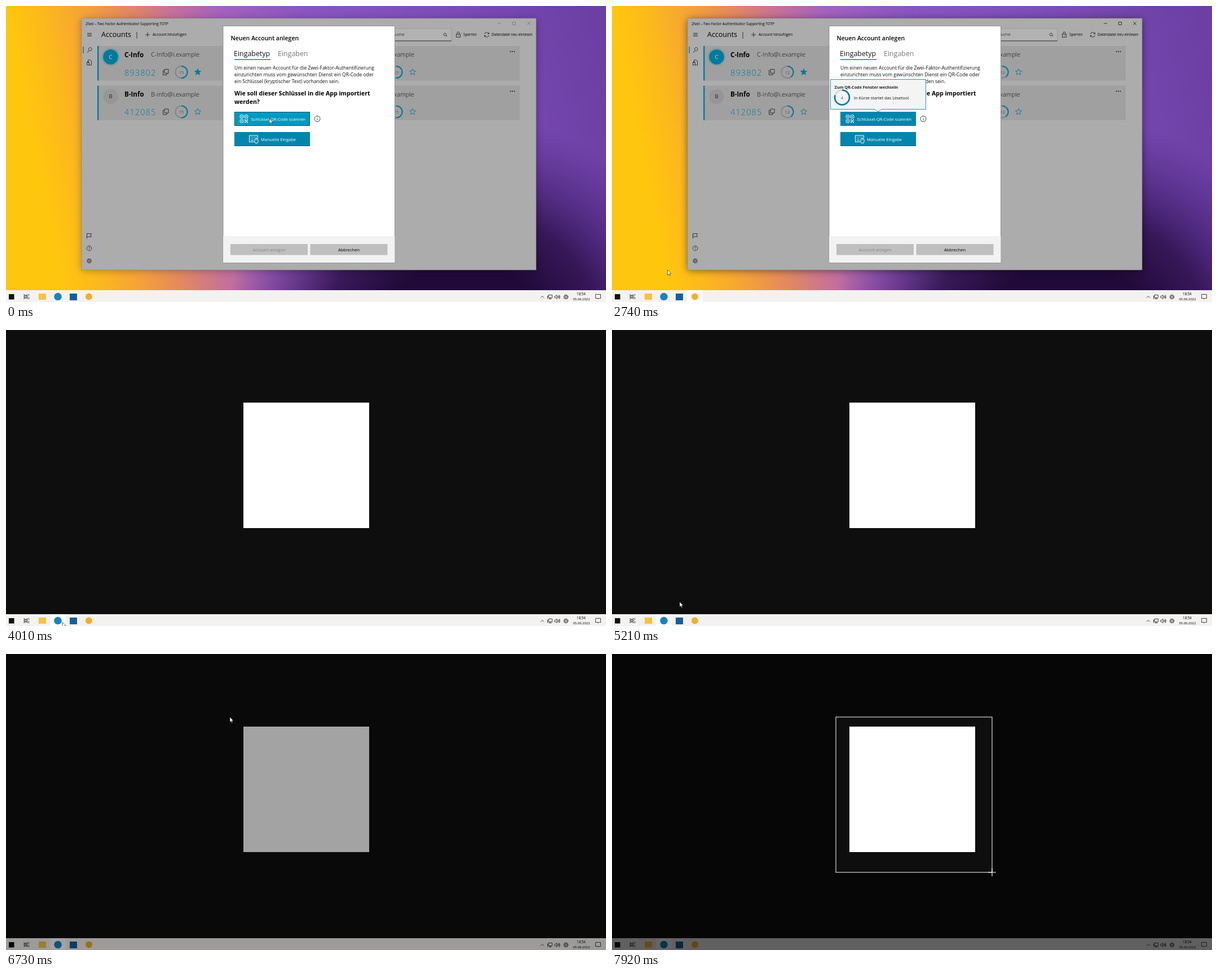
An HTML page for the animation above (8 s loop, 1064 by 526 pixels).

```html
<!DOCTYPE html>
<html lang="de">
<head>
<meta charset="utf-8">
<title>Account anlegen</title>
<style>
html, body { margin: 0; height: 100%; overflow: hidden; background: #0e0e0e; }
svg { display: block; width: 100vw; height: 100vh; }
text { font-family: "Open Sans", "Noto Sans", sans-serif; white-space: pre; }
.line { fill: none; stroke: #161616; stroke-width: .8; }
.white { fill: none; stroke: #fff; stroke-width: 1; }
</style>
</head>
<body>
<svg id="stage" viewBox="0 0 1064 526" preserveAspectRatio="none"></svg>
<script>
const BLUE = '#0086ad', DEEP = '#007b9c';

// Markup helpers; text is placed by the middle of its capitals.
const text = (x, y, size, str, attr = '') =>
  `<text x="${x}" y="${y + size * .357}" font-size="${size}" ${attr}>${str}</text>`;
const rect = (x, y, w, h, fill, attr = '') =>
  `<rect x="${x}" y="${y}" width="${w}" height="${h}" fill="${fill}" ${attr}/>`;
const disc = (x, y, r, fill, attr = '') =>
  `<circle cx="${x}" cy="${y}" r="${r}" fill="${fill}" ${attr}/>`;
const icon = (x, y, d, cls = 'line') =>
  `<path class="${cls}" transform="translate(${x} ${y})" d="${d}"/>`;
const MID = 'text-anchor="middle"';

const gear = (x, y) =>
  disc(x, y, 3.7, 'none', 'stroke="#222" stroke-width="1.1" stroke-dasharray="1.6 1.3"') +
  disc(x, y, 3, 'none', 'stroke="#222" stroke-width=".7"') +
  disc(x, y, 1.2, 'none', 'stroke="#222" stroke-width=".7"');

function star(x, y, fill) {
  const pts = Array.from({ length: 10 }, (_, i) => {
    const r = i % 2 ? 2.6 : 5.8, a = i * Math.PI / 5;
    return (x + r * Math.sin(a)).toFixed(2) + ',' + (y - r * Math.cos(a)).toFixed(2);
  });
  return `<polygon points="${pts.join(' ')}" fill="${fill}" stroke="${DEEP}" stroke-width=".9"/>`;
}

const ring = (x, y, r, w, max, cls, base) =>
  disc(x, y, r, 'none', `stroke="${base}" stroke-width="${w}"`) +
  disc(x, y, r, 'none', `class="${cls}Arc" stroke="${DEEP}" stroke-width="${w}" ` +
    `pathLength="${max}" transform="rotate(-90 ${x} ${y})"`) +
  text(x, y + .3, 7.6, '', `class="${cls}Num" fill="#555" ${MID}`);

function account(y, letter, mail, code, active) {
  const mid = y + 46.5;
  return rect(163, y, 748, 61.5, '#a0a0a0') + rect(162, y, 2.4, 61.5, DEEP) +
    (active ? disc(185.5, y + 19.5, 16, '#0086ad', 'opacity=".2"') : '') +
    disc(185.5, y + 19.5, 13.3, active ? DEEP : '#969696') +
    text(185.5, y + 19.5, 9.5, letter, `${MID} fill="${active ? '#c4d8de' : '#222'}"`) +
    text(210, y + 15.5, 11.6, letter + '-Info', 'font-weight="700"') +
    [257, 638].map(x => text(x, y + 15.5, 11, mail, 'font-weight="300" fill="#111"')).join('') +
    text(210, mid + 1, 14.5, code, `font-weight="300" letter-spacing="1.1" fill="${DEEP}"`) +
    icon(283, mid, 'M-2-5H5V2H-2zM-2-2.500H-4.500V5H2V2') +
    ring(311, mid, 10.6, 2, 30, 'code', '#868686') + ring(692, mid, 10.6, 2, 30, 'code', '#868686') +
    star(340, mid, active ? DEEP : 'none') + star(721, mid, 'none') +
    [894.5, 898, 901.5].map(x => disc(x, y + 10, .9, '#111')).join('');
}

const desktop = rect(0, 0, 1064, 526, 'url(#sky)') + rect(0, 0, 1064, 526, 'url(#night)');

const appWindow =
  rect(134, 24, 806, 446, '#000', 'id="shade" filter="url(#blur)"') +
  rect(134, 22, 806, 447, '#acacac', 'stroke="#8c8c8c" stroke-width=".6"') +
  text(141, 31.5, 6.33, '2fast – Two Factor Authenticator Supporting TOTP') +
  `<g id="caption">${icon(875, 31, 'M-3 0H3')}${icon(901, 31, 'M-2.500-2.500H2.500V2.500H-2.500z')}` +
  `${icon(927, 31, 'M-2.700-2.700L2.700 2.700M2.700-2.700L-2.700 2.700')}</g>` +
  icon(148, 51, 'M-4-2.500H4M-4 0H4M-4 2.500H4') +
  text(169, 50.5, 12.5, 'Accounts') + icon(232, 52, 'M0-6V6') +
  icon(251, 51, 'M-4 0H4M0-4V4') + text(260, 51, 6.5, 'Account hinzufügen') +
  rect(600, 40, 190, 22, '#b2b2b2', 'stroke="#8e8e8e" stroke-width=".6"') + icon(600, 62, 'M0 0H190') +
  text(685.5, 50, 7.5, 'Suche', 'fill="#333"') +
  icon(779, 51, 'M1.500 .700A2.300 2.300 0 1 1 1.500-1.500A2.300 2.300 0 0 1 1.300 .900L3.500 3.300') +
  icon(802, 51, 'M-3.500-1H3.500V4.500H-3.500zM-2-1V-3A2 2 0 0 1 2-3V-1M0 1V2.500') + text(811, 51, 6.4, 'Sperren') +
  icon(852.5, 51, 'M-4-1A4 4 0 0 1 3.500-2M4-4V-1.500H1.500M4 1A4 4 0 0 1-3.500 2M-4 4V1.500H-1.500') +
  text(861, 51, 6.4, 'Datendatei neu einlesen') +
  rect(136.5, 72, 1.4, 12, DEEP) +
  icon(148, 78, 'M-.500 1L-4 4.500M-3 3.500L-2 4.500M-1 .500A2.900 2.900 0 1 1 .500 1.500z') +
  icon(147.5, 100.5, 'M-2-1V-4.500H2L4-2.500V4.500H0M-4 0H0V4.500H-4zM-3 0V-1.500H-1V0') +
  icon(147.5, 408.5, 'M-4 5V-4H4L2.500-1.200L4 1.500H-4') +
  disc(147.5, 430.5, 4.3, 'none', 'stroke="#222" stroke-width=".8"') + text(147.5, 430.5, 6.2, '?', MID) +
  gear(147.5, 453) +
  account(71, 'C', 'C-Info@i.example', '893802', true) +
  account(141.5, 'B', 'B-info@i.example', '412085', false);

const qrGlyph = [[-4, -4], [4, -4], [-4, 4]].map(([x, y]) =>
  `<rect class="white" x="${x - 2.8}" y="${y - 2.8}" width="5.600" height="5.600" rx="1.3"/>` +
  rect(x - .9, y - .9, 1.8, 1.8, '#fff')).join('') +
  [[2, 2], [6, 2], [4, 4], [2, 6], [6, 6]].map(([x, y]) => rect(x - 1, y - 1, 2, 2, '#fff')).join('');

const para = ['Um einen neuen Account für die Zwei-Faktor-Authentifizierung',
  'einzurichten muss vom gewünschten Dienst ein QR-Code oder',
  'ein Schlüssel (kryptischer Text) vorhanden sein.'];

const dialog =
  rect(385, 35.5, 304.5, 420.5, '#fff', 'stroke="#777" stroke-width=".7"') + rect(385, 409, 304.5, 47, '#f2f2f2') +
  text(398.5, 57, 10.5, 'Neuen Account anlegen', 'font-weight="600"') +
  text(404, 85, 12.4, 'Eingabetyp', 'fill="#111"') + text(482, 85, 12.4, 'Eingaben', 'fill="#777"') +
  rect(405, 94.5, 64.5, 1.4, DEEP) +
  para.map((s, i) => text(405, 109.5 + 12 * i, 8.5, s, 'fill="#111"')).join('') +
  text(405, 155, 10.6, 'Wie soll dieser Schlüssel in die App importiert', 'font-weight="700"') +
  text(405, 170, 10.6, 'werden?', 'font-weight="700"') +
  rect(405.5, 188.5, 133, 24, BLUE, 'id="scan" stroke-width="1"') +
  `<g transform="translate(422 200.500)">${qrGlyph}</g>` +
  text(434.5, 201, 7.5, 'Schlüssel-QR-Code scannen', 'fill="#fff"') +
  disc(552, 200.5, 5, 'none', 'stroke="#222" stroke-width=".9"') + icon(552, 200.5, 'M0-2.700V-1.700M0-.700V2.700') +
  rect(405.5, 224.5, 133, 24, BLUE, `stroke="${DEEP}"`) + rect(405, 248, 134, 1, '#00607a') +
  icon(439, 236.5, 'M1 5H-7.500V-6.500H7.500V-2M-5-3.500H-3.500M-2-3.500H-.500M1-3.500H2.500M4-3.500H5.500' +
    'M-5-.500H-3.500M-2-.500H-.500M-5 2.300H0M2 1.500A3 3 0 0 1 8 1.500V4.500A3 3 0 0 1 2 4.500zM5-1.500V2', 'white') +
  text(452, 237.3, 7.5, 'Manuelle Eingabe', 'fill="#fff"') +
  rect(398, 423, 137, 19.5, '#bfbfbf') + text(466.5, 433, 7.5, 'Account anlegen', `${MID} fill="#858585"`) +
  rect(539.5, 423, 137, 19.5, '#bfbfbf') + text(608, 433, 7.5, 'Abbrechen', MID);

const popup = `<g id="popup"><path d="M387.500 130.500H556.500V183.500H478L472 188L466 183.500H387.500z" fill="#f4f4f4" stroke="#1a9bbb"/>` +
  text(394.5, 144, 7.2, 'Zum QR-Code Fenster wechseln', 'font-weight="700" fill="#222"') +
  ring(408, 162.5, 13, 2.6, 5, 'wait', '#d5d5d5') +
  text(429, 163, 7.33, 'In Kürze startet das Lesetool', 'fill="#111"') + '</g>';

const preview = '<g id="preview">' +
  rect(31, 424, 122, 82, '#000', 'opacity=".35" filter="url(#soft)"') +
  rect(32, 424, 120, 81.5, '#e6e3e6') + disc(41, 433, 4.5, '#1b7fb8') +
  text(50, 433, 6.1, '1*Qdq7r4fnjGeRhzsZBoSeTQ.p...') +
  rect(36, 442, 111, 2, '#f6f6f6') + rect(36, 446, 111, 55, '#0e0e0e') + rect(80, 461.5, 24, 24, '#fff') + '</g>';

const viewer = '<g id="viewer">' + rect(0, 0, 1064, 526, '#0e0e0e') + rect(421, 129, 223, 223, '#fff') + '</g>';

const taskbar = rect(0, 505, 1064, 21, '#f3f2f1') +
  rect(78.5, 505, 27, 21, '#fff', 'id="browserTab"') + rect(133.5, 505, 27, 21, '#fff', 'id="appTab"') +
  rect(5, 512, 9.5, 9.5, '#111') +
  icon(36, 516.5, 'M-4-4.500V-2.500H2V-4.500M-4 4.500V2.500H2V4.500M-4-1.200H2V1.200H-4zM4.500-4.500V-1.500M4.500 .500V4.500') +
  rect(58, 511, 13, 11, '#f5c242') + disc(92, 516.5, 6.8, '#1783c6') +
  rect(113, 511, 13, 12, '#155f9e') + disc(147, 516.5, 6, '#eeb02c') +
  icon(951, 517, 'M-3 1.500L0-1.500L3 1.500') +
  icon(964, 517, 'M-2-3.500H4.500V1.500H-2zM1 1.500V3.500M-1.500 3.500H3.500M-4-1.500H-2M-3.500-1.500V3.500') +
  icon(977, 517, 'M-4-1.500H-2.500L0-3.500V3.500L-2.500 1.500H-4zM1.500-1.500Q2.500 0 1.500 1.500M3-2.500Q4.500 0 3 2.500M4.300-3.500Q6.400 0 4.300 3.500') +
  gear(993, 517) + text(1020, 511.5, 6.2, '18:54', MID) + text(1020.5, 521, 5.9, '05.06.2022', MID) +
  icon(1050, 516.5, 'M-4.500-4H4.500V3H1.500L0 4.500V3H-4.500z');

const stops = list => list.map(([o, c, a = 1]) =>
  `<stop offset="${o}" stop-color="${c}" stop-opacity="${a}"/>`).join('');

document.getElementById('stage').innerHTML = `<defs>
  <linearGradient id="sky" gradientUnits="userSpaceOnUse" x1="0" y1="0" x2="1000" y2="-200">${stops([
    [0, '#ffc60e'], [.06, '#fcb91c'], [.13, '#f5a336'], [.2, '#e48a5c'], [.28, '#c67198'],
    [.36, '#a562bd'], [.5, '#8956c0'], [.75, '#7c4db6'], [1, '#6b3fa4']])}</linearGradient>
  <radialGradient id="night" gradientUnits="userSpaceOnUse" cx="810" cy="620" r="430">${stops([
    [.38, '#210a39'], [.6, '#2b0f48', .85], [1, '#4a2080', 0]])}</radialGradient>
  <filter id="blur"><feGaussianBlur stdDeviation="7"/></filter>
  <filter id="soft"><feGaussianBlur stdDeviation="2.5"/></filter>
</defs>` + desktop + appWindow + dialog + popup + preview + viewer + taskbar +
  '<path id="dim" fill="#000" fill-rule="evenodd"/><rect id="frame" class="white"/>' +
  '<path id="cross" d="M-7 0H7M0-7V7" stroke="#fff" stroke-width="1.1"/>' +
  '<path id="arrow" d="M0 0V9L2.100 7.200L3.500 10.400L4.900 9.800L3.500 6.700H6.300z" fill="#fff" stroke="#111" stroke-width=".6"/>';

const el = id => document.getElementById(id);
const all = cls => document.querySelectorAll('.' + cls);
const show = (id, on) => el(id).style.display = on ? '' : 'none';
const place = (id, [x, y]) => el(id).setAttribute('transform', `translate(${x} ${y})`);

// Share done of a change made in n even steps from a to b.
const steps = (t, a, b, n) => t < a ? 0 : Math.min(1, (Math.floor((t - a) / (b - a) * (n - 1) + 1e-6) + 1) / n);

function along(pts, s) {
  const p = s * (pts.length - 1), i = Math.min(Math.floor(p), pts.length - 2), f = p - i;
  return pts[i].map((v, k) => v + (pts[i + 1][k] - v) * f);
}

// Pointer moves: start, end, steps, way points.
const moves = [
  [70, 71, 1, [[467, 200], [467, 198]]],
  [1920, 2670, 10, [[467, 198], [440, 222], [300, 320], [165, 420], [115, 451]]],
  [2740, 3280, 8, [[115, 451], [82, 487], [54, 511], [75, 517], [100, 519]]],
  [5140, 5910, 12, [[100, 519], [130, 465], [235, 325], [345, 190], [386, 137]]],
  [5980, 6190, 4, [[386, 137], [393, 122], [397, 112]]]
];
const drag = [[397, 112], [485, 205], [580, 300], [655, 385], [674, 403], [674, 388]];

function count(cls, n, max) {
  all(cls + 'Arc').forEach(e => e.setAttribute('stroke-dasharray', `${n} ${max}`));
  all(cls + 'Num').forEach(e => e.textContent = n);
}

function draw(t) {
  const left = 15 - [470, 930, 2300, 3020].filter(x => t >= x).length;
  count('code', left, 30);
  count('wait', Math.min(5, left - 8), 5);

  const focus = steps(t, 470, 600, 3) - steps(t, 3680, 3750, 2);
  el('shade').setAttribute('opacity', .3 + .2 * focus);
  el('caption').setAttribute('opacity', .35 + .65 * focus);
  const hover = t < 930 ? 0 : t < 1390 ? 1 : 2;
  el('scan').setAttribute('fill', ['#0099c0', '#0090b6', BLUE][hover]);
  el('scan').setAttribute('stroke', ['#00566e', '#006580', DEEP][hover]);

  el('popup').setAttribute('opacity', steps(t, 930, 1060, 2) * (1 - steps(t, 3680, 3750, 2)));
  el('preview').setAttribute('opacity', steps(t, 3680, 3750, 2));
  show('viewer', t >= 4010);
  show('appTab', t >= 470 && t < 4010);
  show('browserTab', t >= 3100);

  const move = moves.filter(m => t >= m[0]).pop() || moves[0];
  place('arrow', along(move[3], steps(t, ...move)));
  show('arrow', t < 6870);

  const [x, y] = along(drag, steps(t, 7220, 7920, 11));
  const w = x - 397, h = y - 112, picking = t >= 7220;
  place('cross', [x, y]);
  show('cross', t >= 6870);
  show('frame', picking);
  const frame = { x: 397, y: 112, width: w, height: h };
  for (const k in frame) el('frame').setAttribute(k, frame[k]);
  el('dim').setAttribute('d', 'M0 0H1064V526H0z' + (picking ? `M397 112h${w}v${h}h${-w}z` : ''));
  el('dim').setAttribute('opacity', .6 * steps(t, 6590, 6870, 5));
}

const start = performance.now();
function tick(now) {
  draw(Math.max(0, now - start) % 8000);
  requestAnimationFrame(tick);
}
draw(0);
requestAnimationFrame(tick);
</script>
</body>
</html>
```
